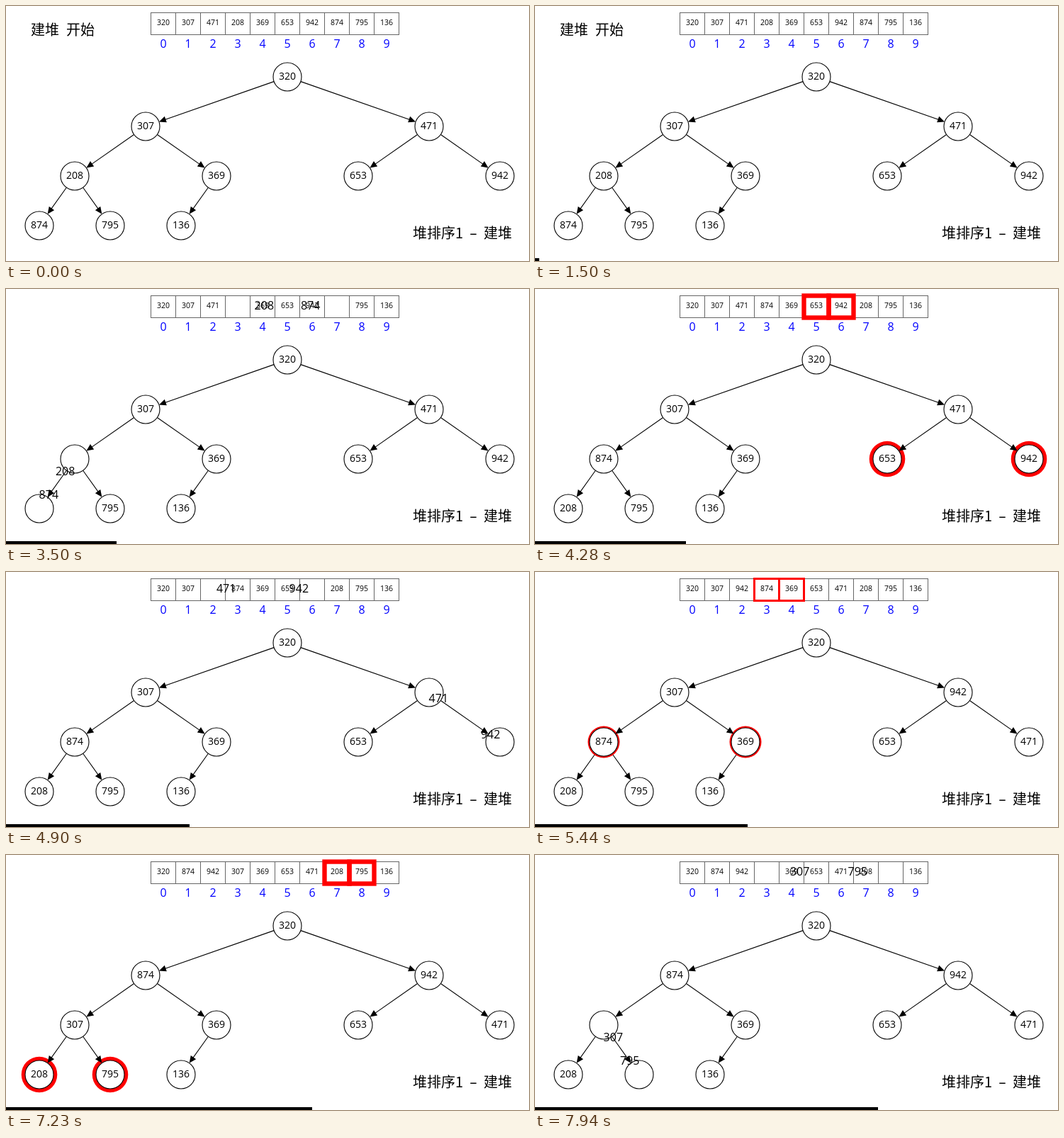
These frames come from a looping animation (738 by 360 pixels, 8 s). An HTML page with a canvas:

```html
<!DOCTYPE html>
<html lang="zh">
<head>
<meta charset="utf-8">
<title>建堆</title>
<style>
  html, body { margin: 0; width: 100%; height: 100%; overflow: hidden; background: #fff; }
  canvas { display: block; }
</style>
</head>
<body>
<canvas id="stage" width="738" height="360"></canvas>
<script>
const ctx = document.getElementById('stage').getContext('2d');
const LOOP = 8000, TOTAL_STEPS = 128, RADIUS = 20, CELL = 35;
const DIGITS = '"Open Sans", "Noto Sans", sans-serif';
const HAN = '"Noto Sans CJK SC", "Noto Sans CJK", sans-serif';
const VALUES = [320, 307, 471, 208, 369, 653, 942, 874, 795, 136];
const NODES = [[397, 100], [197, 170], [597, 170], [97, 240], [297, 240],
               [497, 240], [697, 240], [47, 310], [147, 310], [247, 310]];

// Steps come in runs of 11, each run starting at one of these times.
const RUN_STARTS = [1500, 2340, 3200, 4040, 4900, 5750, 6600, 7470];
const RUN = 11, STEP_MS = 77.3;

// One sift: compare the children, compare parent and larger child, swap those two.
const SIFTS = [[3, 7, 8], [2, 6, 5], [1, 3, 4], [3, 8, 7]];
const FIRST_COMPARE = 10, FIRST_SIFT = 14, SIFT_STEPS = 19, COMPARE_STEPS = 6, SWAP_STEPS = 7.5;

function stepAt(time) {
  const run = RUN_STARTS.filter(start => start <= time).length - 1;
  if (run < 0) return 0;
  const inRun = Math.floor((time - RUN_STARTS[run]) / STEP_MS + 0.15);
  return run * RUN + 1 + Math.min(RUN - 1, inRun);
}

function stateAt(step) {
  const values = [...VALUES];
  if (step < FIRST_COMPARE) return { values, marked: [], swap: [] };
  if (step < FIRST_SIFT) return { values, marked: [4, 9], age: step - 9.5, swap: [] };

  const sift = Math.floor((step - FIRST_SIFT) / SIFT_STEPS);
  const phase = (step - FIRST_SIFT) % SIFT_STEPS;
  for (const [a, b] of SIFTS.slice(0, sift)) [values[a], values[b]] = [values[b], values[a]];

  const [parent, larger, other] = SIFTS[sift];
  if (phase < COMPARE_STEPS) return { values, marked: [larger, other], age: phase, swap: [] };
  if (phase < 2 * COMPARE_STEPS) {
    return { values, marked: [parent, larger], age: phase - COMPARE_STEPS, swap: [] };
  }
  const progress = (phase - 2 * COMPARE_STEPS + 1) / SWAP_STEPS;
  return { values, marked: [], swap: [parent, larger], progress };
}

const cellCenter = i => [222 + CELL * i, 24.5];

function text(string, x, y, size, family, color = '#000', align = 'left') {
  ctx.font = `${size}px ${family}`;
  ctx.textAlign = align;
  ctx.fillStyle = color;
  ctx.fillText(string, x, y);
}

function number(value, [x, y], size, color) {
  text(value, x, y - 1 + size * 0.357, size, DIGITS, color, 'center');
}

function disc(x, y, radius, color) {
  ctx.beginPath();
  ctx.arc(x, y, radius, 0, 2 * Math.PI);
  ctx.fillStyle = color;
  ctx.fill();
}

function arrow([x1, y1], [x2, y2]) {
  const length = Math.hypot(x2 - x1, y2 - y1);
  const tip = length - RADIUS;
  ctx.save();
  ctx.translate(x1, y1);
  ctx.rotate(Math.atan2(y2 - y1, x2 - x1));
  ctx.beginPath();
  ctx.moveTo(RADIUS, 0);
  ctx.lineTo(tip - 5, 0);
  ctx.stroke();
  ctx.beginPath();
  ctx.moveTo(tip, 0);
  ctx.lineTo(tip - 10, -4.5);
  ctx.lineTo(tip - 10, 4.5);
  ctx.fillStyle = '#000';
  ctx.fill();
  ctx.restore();
}

function drawArray({ values, marked, swap }, glow) {
  ctx.lineWidth = 1;
  ctx.strokeStyle = '#666';
  values.forEach((value, i) => {
    ctx.strokeRect(204.5 + CELL * i, 9.5, CELL, 31);
    if (!swap.includes(i)) number(value, cellCenter(i), 10.5);
    number(i, [222 + CELL * i, 54], 16, '#00f');
  });
  ctx.lineWidth = glow * 1.2;
  ctx.strokeStyle = '#f00';
  for (const i of marked) ctx.strokeRect(204.5 + CELL * i, 9.5, CELL, 31);
}

function drawTree({ values, marked, swap }, glow) {
  ctx.lineWidth = 1.1;
  ctx.strokeStyle = '#000';
  // Children first, so that a parent's ring covers the start of its arrows.
  for (let i = NODES.length - 1; i >= 0; i--) {
    const node = NODES[i];
    if (marked.includes(i)) disc(...node, RADIUS + glow, '#f00');
    disc(...node, RADIUS, '#fff');
    ctx.stroke();
    if (!swap.includes(i)) number(values[i], node, 14);
    if (i > 0) arrow(NODES[(i - 1) >> 1], node);
  }
}

function drawMoving({ values, swap: [a, b], progress }) {
  const between = (from, to) => from.map((v, k) => v + (to[k] - v) * progress);
  for (const [from, to] of [[a, b], [b, a]]) {
    number(values[from], between(cellCenter(from), cellCenter(to)), 16);
    number(values[from], between(NODES[from], NODES[to]), 16);
  }
}

function draw(time) {
  const step = stepAt(time);
  const state = stateAt(step);
  const glow = 2.5 + 0.7 * (state.age || 0);

  ctx.fillStyle = '#fff';
  ctx.fillRect(0, 0, 738, 360);
  drawArray(state, glow);
  drawTree(state, glow);
  if (state.swap.length) drawMoving(state);

  if (step < FIRST_COMPARE) {
    text('建堆', 35, 41, 20, HAN);
    text('开始', 85, 41, 20, HAN);
  }
  text('堆排序1', 574, 328, 20, HAN);
  text('–', 654.5, 328, 20, DIGITS);
  text('建堆', 674, 328, 20, HAN);

  ctx.fillStyle = '#000';
  ctx.fillRect(0, 356, Math.round(738 * step / TOTAL_STEPS), 4);
}

const begin = performance.now();
function tick() {
  draw((performance.now() - begin) % LOOP);
  requestAnimationFrame(tick);
}
tick();
</script>
</body>
</html>
```
